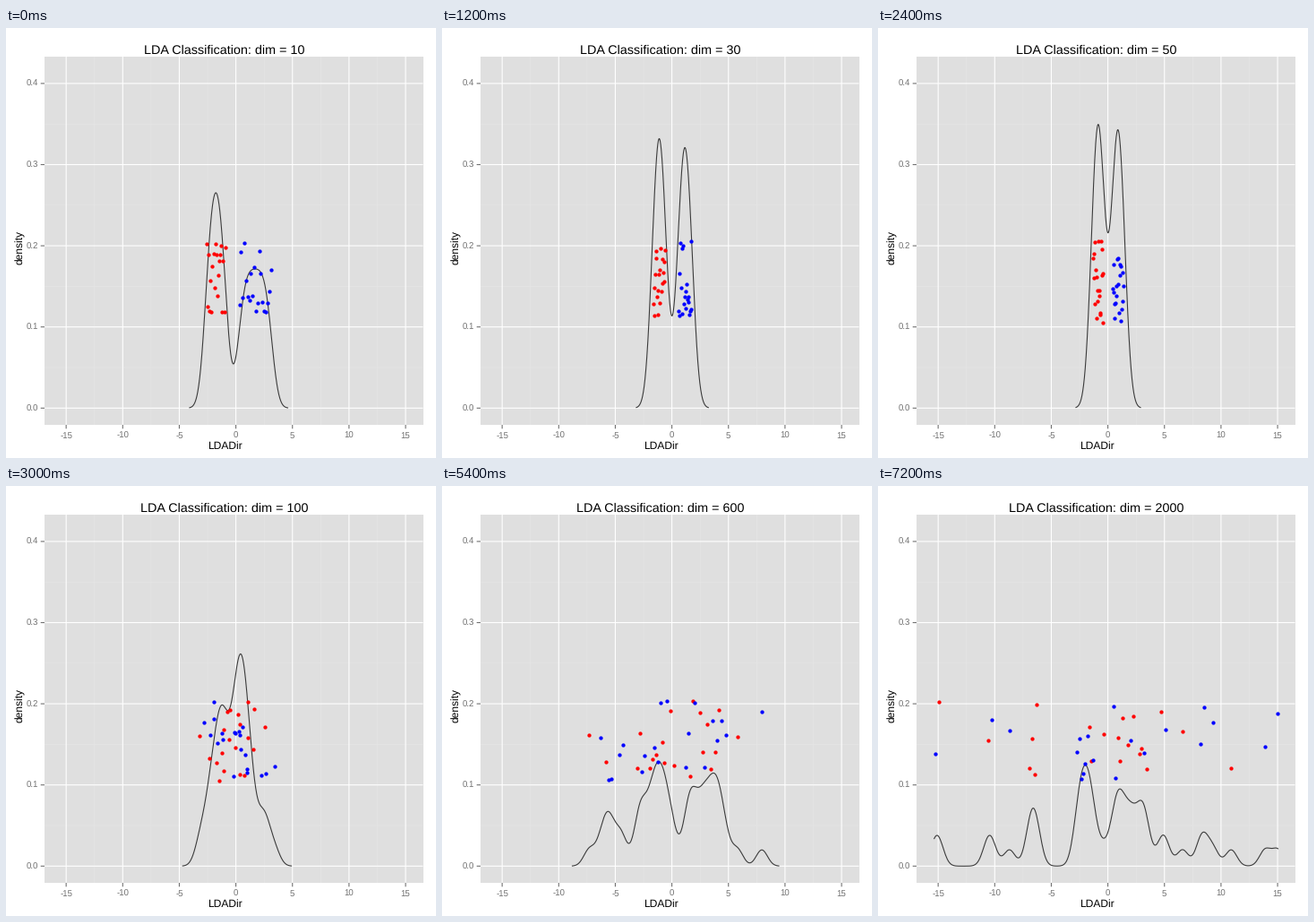
A matplotlib script for the animation above (7800 ms loop, 480 px wide and 480 px high).

```python
import numpy as np
import matplotlib.pyplot as plt
from matplotlib.animation import FuncAnimation
from matplotlib.patches import Rectangle

SIZE = 480
PT = 0.75  # points per pixel at 96 dpi
LEFT, TOP, RIGHT, BOTTOM = 43, 32, 465.5, 443
BANDWIDTH = 0.5
X_RANGE = -15.35, 15.03  # the curve is cut off here
CLASS_SIZE = 20
GREY = "#707070"

plt.rcParams.update({"font.family": "Liberation Sans", "text.hinting": "none"})


def px(x):
    return 256.6 + 12.63 * np.asarray(x)


def py(y):
    return 424.3 - 906 * np.asarray(y)


def two_classes(left, left_width, right, right_width):
    """Separated classes, red then blue, each spread evenly about its centre."""
    steps = np.linspace(-1, 1, CLASS_SIZE)
    return np.concatenate([left + left_width * steps,
                           right + right_width * steps])


def bumps(*groups):
    """Mixed classes: groups of (centre, count), wider when fuller."""
    return np.concatenate([c + 0.08 * n * np.linspace(-1, 1, n) if n > 1
                           else [c] for c, n in groups])


def cloud(seed, low, high):
    """Mixed classes: one normal cloud fitted to low..high."""
    x = np.random.default_rng(seed).normal(size=2 * CLASS_SIZE)
    return low + (x - x.min()) * (high - low) / np.ptp(x)


plots = {
    10: two_classes(-1.77, 0.82, 1.7, 1.38),
    20: two_classes(-1.5, 0.67, 1.45, 0.8),
    30: two_classes(-1.12, 0.52, 1.15, 0.57),
    40: two_classes(-0.96, 0.45, 1, 0.48),
    50: two_classes(-0.87, 0.45, 0.9, 0.48),
    100: cloud(100, -3.2, 3.4),
    200: cloud(200, -3.8, 8),
    300: bumps((-6, 1), (-3.9, 4), (-2.4, 7), (-1.1, 4), (-0.2, 7),
               (0.75, 3), (1.7, 3), (2.5, 4), (3.4, 5), (4.95, 2)),
    400: cloud(400, -6.5, 5.3),
    600: bumps((-7.3, 1), (-6.3, 1), (-5.6, 3), (-4.5, 2), (-2.75, 4),
               (-1.2, 9), (0, 2), (1.65, 5), (2.8, 4), (3.9, 6),
               (4.8, 1), (5.8, 1), (7.95, 1)),
    800: cloud(800, -12.7, 7.4),
    1000: bumps((-14.3, 1), (-8.4, 3), (-5.3, 4), (-3, 1), (-1.3, 8),
                (0.8, 5), (2.25, 8), (3.8, 4), (5.6, 4), (6.7, 1), (7.5, 1)),
    2000: bumps((-15.1, 2), (-10.45, 2), (-8.7, 1), (-6.6, 4), (-2, 9),
                (-0.4, 1), (0.9, 5), (2, 3), (3.1, 4), (4.9, 2), (6.6, 1),
                (8.35, 2), (9.3, 1), (10.9, 1), (13.9, 1), (15, 1)),
}
dims = list(plots)


def density(x):
    """Gaussian kernel density of all dots, ending three bandwidths out."""
    low, high = np.clip([x.min() - 3 * BANDWIDTH, x.max() + 3 * BANDWIDTH],
                        *X_RANGE)
    grid = np.linspace(low, high, 400)
    z = (grid[:, None] - x) / BANDWIDTH
    height = np.exp(-z ** 2 / 2).mean(axis=1) / (BANDWIDTH * np.sqrt(2 * np.pi))
    return px(grid), py(height)


fig = plt.figure(figsize=(5, 5), dpi=96, facecolor="white")
ax = fig.add_axes([0, 0, 1, 1])
ax.set(xlim=(0, SIZE), ylim=(SIZE, 0))
ax.axis("off")
ax.add_patch(Rectangle((LEFT, TOP), RIGHT - LEFT, BOTTOM - TOP,
                       fc="#dfdfdf", lw=0, zorder=0))


def rule(xs, ys, color="white", width=1.1, z=2):
    ax.plot(xs, ys, color=color, lw=width * PT, zorder=z, snap=False,
            solid_capstyle="butt")


def label(x, y, text, size, color="black", **kw):
    kw = {"ha": "center", "va": "baseline", **kw}
    return ax.text(x, y, text, fontsize=size * PT, color=color, **kw)


minor = dict(color="#e6e6e6", width=0.6, z=1)
for x in px(np.arange(-12.5, 13, 5)):
    rule([x, x], [TOP, BOTTOM], **minor)
for y in py(np.arange(0.05, 0.4, 0.1)):
    rule([LEFT, RIGHT], [y, y], **minor)

for value in range(-15, 16, 5):
    x = px(value)
    rule([x, x], [TOP, BOTTOM])
    rule([x, x], [BOTTOM, BOTTOM + 4.3], GREY)
    label(x, 458, str(value), 9.6, GREY)
for value in np.arange(5) / 10:
    y = py(value)
    rule([LEFT, RIGHT], [y, y])
    rule([LEFT - 4.3, LEFT], [y, y], GREY)
    label(36, y + 3.5, f"{value:.1f}", 9.6, GREY, ha="right")

label(244.3, 470, "LDADir", 12)
label(16.3, 244.5, "density", 12, rotation=90, va="center")

title = label(244.2, 28.7, "", 14.4)
curve, = ax.plot([], [], color="#3a3a3a", lw=1.1 * PT, zorder=3)
dot_style = dict(ls="", marker="o", ms=4.3 * PT, mew=0, zorder=4)
reds, = ax.plot([], [], color="red", **dot_style)
blues, = ax.plot([], [], color="blue", **dot_style)


def draw(i):
    dim = dims[i]
    x = plots[dim]
    title.set_text(f"LDA Classification: dim = {dim}")
    curve.set_data(*density(x))

    rng = np.random.default_rng(dim)
    order = np.arange(len(x)) if dim <= 50 else rng.permutation(len(x))
    dots_x, dots_y = px(x[order]), py(rng.uniform(0.104, 0.207, len(x)))
    reds.set_data(dots_x[:CLASS_SIZE], dots_y[:CLASS_SIZE])
    blues.set_data(dots_x[CLASS_SIZE:], dots_y[CLASS_SIZE:])
    return title, curve, reds, blues


anim = FuncAnimation(fig, draw, frames=len(dims), interval=600,
                     init_func=lambda: draw(0), repeat=True, repeat_delay=0)
plt.show()
```
